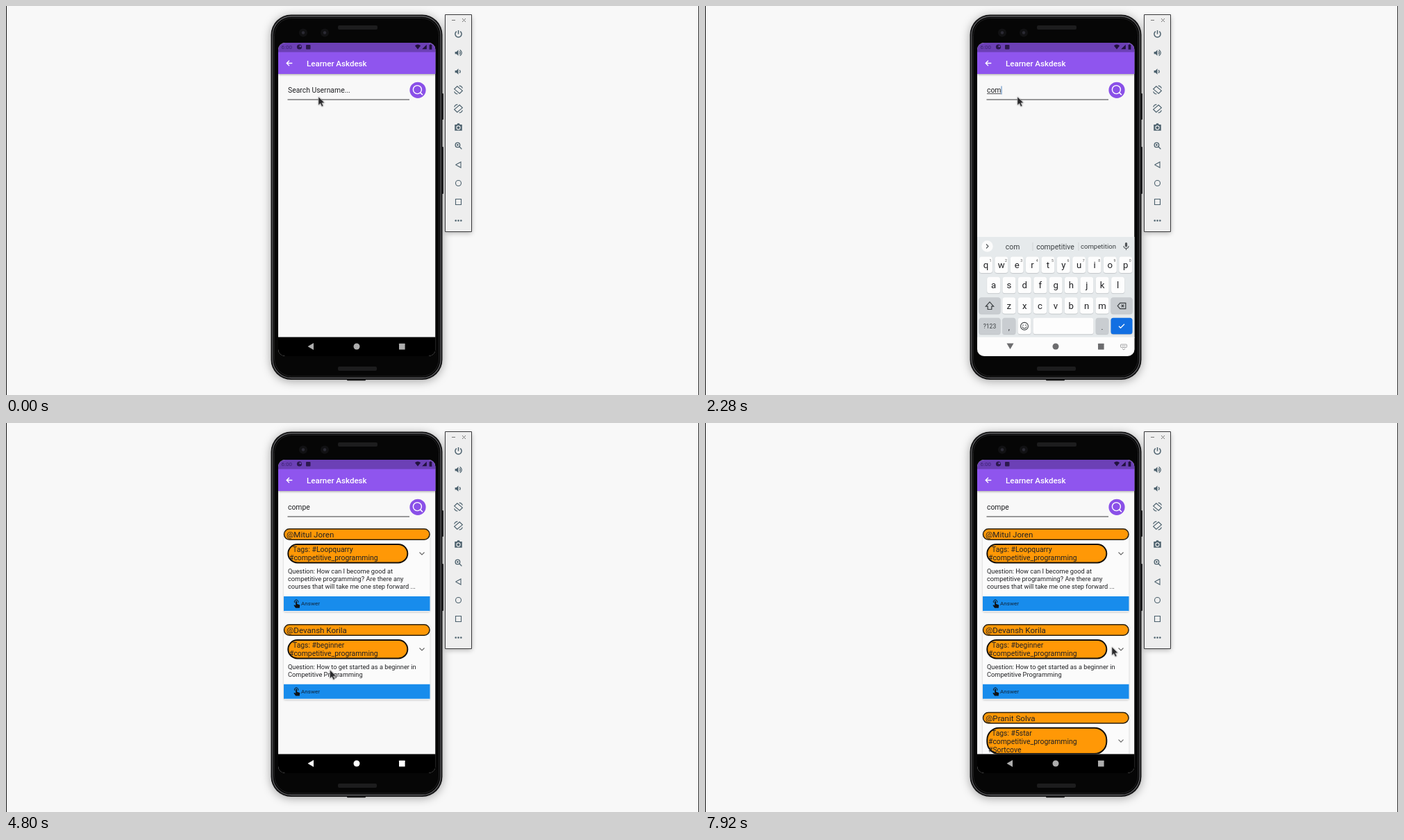
Animation of 998 by 561 pixels, one loop 8 s. Source, as an HTML page with a canvas:

```html
<!DOCTYPE html>
<html lang="en">
<head>
<meta charset="utf-8">
<title>Search demo</title>
<style>
  html, body { margin: 0; width: 100%; height: 100%; overflow: hidden; background: #f8f8f8; }
  canvas { display: block; }
</style>
</head>
<body>
<canvas id="stage" width="998" height="561"></canvas>
<script>
const ctx = document.getElementById('stage').getContext('2d');
const LOOP = 8000;
const ORANGE = '#ff9806', PURPLE = '#8f55ee', INK = '#202124', SLATE = '#4d626e', PAPER = '#f8f8f8';
const SCREEN = { x: 392, y: 53, w: 226.5, h: 452 };
const KEY_STEP = 22.37, KB_TOP = 333, KB_TRAVEL = 172;

const TYPED = [[1800, 'c'], [2000, 'co'], [2200, 'com'], [2440, 'comp'], [2700, 'compe']];
const LIST_AT = 2440, THIRD_AT = 5880;
const KB_PATH = [[740, 172], [840, 72], [920, 72], [1040, 0], [4160, 0], [4200, 8], [4280, 66], [4360, 172]];
const MOUSE_X = [[3000, 450], [3280, 447], [4400, 446], [5160, 485], [6200, 485], [7280, 586]];
const MOUSE_Y = [[3000, 131], [3280, 362], [3720, 491], [4400, 491], [5160, 235], [6200, 235], [7280, 323]];

const CARDS = [
  { y: 0, name: '@Mitul Joren', tags: ['Tags: #Loopquarry', '#competitive_programming'],
    ask: ['Question: How can I become good at', 'competitive programming? Are there any', 'courses that will take me one step forward ...'] },
  { y: 138, name: '@Devansh Korila', tags: ['Tags: #beginner', '#competitive_programming'],
    ask: ['Question: How to get started as a beginner in', 'Competitive Programming'] },
  { y: 264.7, name: '@Pranit Solva', tags: ['Tags: #5star', '#competitive_programming', '#Sortcove'], ask: [] }
];

const ICONS = {
  search: 'M16 10a6 6 0 1 1-12 0a6 6 0 0 1 12 0M14.5 14.5L21 21',
  sticker: 'M4 4h16v11l-5 5H4zM20 14h-6v6M8 9h1M15 9h1M8 13q2 3 4 2',
  clip: 'M5 4h14v17H5zM9 2h6v4H9zM8 10h8M8 14h8M8 17h5',
  micBody: 'M12 2a3 3 0 0 1 3 3v6a3 3 0 0 1-6 0V5a3 3 0 0 1 3-3z',
  micStand: 'M5.5 11a6.5 6.5 0 0 0 13 0M12 17.5V22',
  shift: 'M12 3L21 13H16.5V20H7.5V13H3z',
  erase: 'M8 5H22V19H8L2 12zM11.5 9l6 6M17.5 9l-6 6',
  check: 'M4 12l5 5L20 6',
  power: 'M12 2v10M7 5a8.5 8.5 0 1 0 10 0',
  speaker: 'M3 9h4l5-5v16l-5-5H3z',
  wave: 'M15 8q4 4 0 8',
  bigWave: 'M16 4q10 8 0 16',
  rotate: 'M9 3L22 14L15 21L2 10zM14 2q6 0 8 6M10 22q-6 0-8-6',
  zoom: 'M16 10a6 6 0 1 1-12 0a6 6 0 0 1 12 0M14.5 14.5L21 21M10 7.5v5M7.5 10h5',
  camera: 'M3 6h5l2-3h4l2 3h5v15H3z',
  touch: 'M8 23l-5-7 2-1.5 3 2V6a1.7 1.7 0 0 1 3.4 0v6l8 3-1 8z',
  tap: 'M5.5 9a5 5 0 1 1 8.5 0',
  back: 'M21 12H4M12 4l-8 8 8 8',
  wifi: 'M12 21L1 7q11-9 22 0z',
  signal: 'M2 22L22 2V22z',
  battery: 'M7 4h3V2h4v2h3v18H7z'
};
for (const name in ICONS) ICONS[name] = new Path2D(ICONS[name]);

// Icons sit on a 24-unit grid; a line width strokes them, none fills them.
function icon(name, x, y, size, color, lw) {
  ctx.save();
  ctx.translate(x - size / 2, y - size / 2);
  ctx.scale(size / 24, size / 24);
  if (lw) {
    ctx.strokeStyle = color;
    ctx.lineWidth = lw * 24 / size;
    ctx.stroke(ICONS[name]);
  } else {
    ctx.fillStyle = color;
    ctx.fill(ICONS[name]);
  }
  ctx.restore();
}

function paint(fill, stroke, lw = 1) {
  if (fill) { ctx.fillStyle = fill; ctx.fill(); }
  if (stroke) { ctx.strokeStyle = stroke; ctx.lineWidth = lw; ctx.stroke(); }
}

function box(x, y, w, h, r, fill, stroke, lw) {
  ctx.beginPath();
  ctx.roundRect(x, y, w, h, r);
  paint(fill, stroke, lw);
}

function disc(x, y, r, fill, stroke, lw) {
  ctx.beginPath();
  ctx.arc(x, y, r, 0, Math.PI * 2);
  paint(fill, stroke, lw);
}

function poly(points, fill, stroke, lw) {
  ctx.beginPath();
  points.forEach(([x, y]) => ctx.lineTo(x, y));
  if (fill) ctx.closePath();
  paint(fill, stroke, lw);
}

function text(s, x, y, size, color = INK, weight = 400, align = 'left') {
  ctx.font = `${weight} ${size}px Roboto, "Open Sans", sans-serif`;
  ctx.textAlign = align;
  ctx.fillStyle = color;
  ctx.fillText(s, x, y);
}

function shadow(color, blur, dy, draw) {
  ctx.save();
  ctx.shadowColor = color;
  ctx.shadowBlur = blur;
  ctx.shadowOffsetY = dy;
  draw();
  ctx.restore();
}

function track(keys, t) {
  if (t <= keys[0][0]) return keys[0][1];
  for (let i = 1; i < keys.length; i++) {
    const [t0, a] = keys[i - 1], [t1, b] = keys[i];
    if (t < t1) return a + (b - a) * (t - t0) / (t1 - t0);
  }
  return keys[keys.length - 1][1];
}

function dots(x, y, gap, r, color) {
  for (let i = -1; i <= 1; i++) disc(x + i * gap, y, r, color);
}

function phone() {
  shadow('rgba(0,0,0,.35)', 14, 2, () => box(381.5, 12.5, 247, 526.5, 29, '#141415'));
  box(491, 538, 27, 2.2, 1, '#141415');
  box(627.5, 126, 2.5, 38, 1, '#1b1b1d');
  box(627.5, 203, 2.5, 68, 1, '#1b1b1d');
  box(384, 15, 242, 521.5, 27, '#050505', '#5f5f62', 1.3);
  box(386.5, 17.5, 237, 516.5, 25, '#060606', '#222223', 1);
  for (const x of [428, 459]) {
    disc(x, 38.5, 6, '#111113');
    disc(x, 38.5, 2.2, '#2b2a33');
  }
  box(478, 28, 57, 6, 2, '#1d1d1e');
  box(478, 520, 56, 6, 2, '#1d1d1e');
}

function panel() {
  shadow('rgba(0,0,0,.3)', 7, 2, () => box(632.5, 12.5, 38, 313, 0, '#eeeeee'));
  box(632.5, 12.5, 38, 313, 0, null, '#39393b', 1);
  poly([[642, 20.5], [647, 20.5]], null, '#777', 1);
  poly([[657, 18], [662, 23]], null, '#777', 1);
  poly([[662, 18], [657, 23]], null, '#777', 1);
  const x = 651.5;
  icon('power', x, 40.5, 13, SLATE, 1.5);
  for (const y of [67.5, 94.5]) {
    icon('speaker', x, y, 13, SLATE);
    icon('wave', x, y, 13, SLATE, 1.2);
  }
  icon('bigWave', x, 67.5, 13, SLATE, 1.2);
  icon('rotate', x, 121, 14, SLATE, 1.2);
  ctx.save();
  ctx.translate(2 * x, 0);
  ctx.scale(-1, 1);
  icon('rotate', x, 148, 14, SLATE, 1.2);
  ctx.restore();
  icon('camera', x, 174.5, 14, SLATE);
  disc(x, 175.5, 2.6, SLATE, '#eeeeee', 1.1);
  icon('zoom', x, 201.5, 13, SLATE, 1.4);
  poly([[647.5, 229], [655, 225], [655, 233], [647.5, 229]], null, SLATE, 1.1);
  disc(x, 255.5, 4, null, SLATE, 1.1);
  box(647.5, 278.5, 8, 8, 0, null, SLATE, 1.1);
  dots(x, 309.5, 3.8, 1.3, SLATE);
}

function card({ y, name, tags, ask }) {
  const grow = (tags.length - 2) * 11;
  const bar = 250 + (ask.length - 3) * 11.3 + grow;
  ctx.save();
  ctx.translate(0, y);
  shadow('rgba(0,0,0,.2)', 3, 1, () => box(400, 153, 210.5, bar - 131, 2, '#fbfbfb'));
  box(400.5, 152.8, 209.5, 15.4, 7.7, ORANGE, '#2a2110', 1.5);
  text(name, 404, 165, 11.56);
  box(406.3, 175, 172, 26.4 + grow, 17.3, ORANGE, '#15110a', 2);
  tags.forEach((s, i) => text(s, i ? 408 : 413, 186 + i * 12, 10.4));
  const mid = 188 + grow / 2;
  poly([[595.5, mid - 1.5], [599, mid + 2], [602.5, mid - 1.5]], null, '#666', 1.1);
  ask.forEach((s, i) => text(s, 406, 216.5 + i * 11, 9.24));
  if (ask.length) {
    box(400, bar, 210.5, 21, 0, '#188cec');
    icon('touch', 419.3, bar + 10.8, 13, '#101418');
    icon('tap', 419.3, bar + 10.8, 13, '#101418', 1);
    text('Answer', 425, bar + 13.4, 8.1, '#10253a');
  }
  ctx.restore();
}

function caretOn(t) {
  if (t < 560) return false;
  if (t < 1800) return t < 1060 || t >= 1540;
  if (t < 3760) return t < 3240;
  if (t < 4800) return true;
  return Math.floor((t - 4800) / 500) % 2 === 1;
}

function app(t, typed, kbShown) {
  box(SCREEN.x, SCREEN.y, SCREEN.w, SCREEN.h, 0, PAPER);
  if (t >= LIST_AT) {
    ctx.save();
    ctx.beginPath();
    ctx.rect(392, 140, 227, (kbShown ? KB_TOP : 477.5) - 140);
    ctx.clip();
    CARDS.slice(0, t < THIRD_AT ? 2 : 3).forEach(card);
    ctx.restore();
  }
  shadow('rgba(0,0,0,.35)', 3, 1, () => box(392, 66, 227, 32, 0, PURPLE));
  box(392, 52, 227, 14.5, 0, '#6c40b6');
  text('6:00', 396.5, 62.3, 8, '#3d2273');
  disc(422.5, 59, 3.6, '#2c184f');
  box(422.5, 57, 2.6, 2.2, 0, '#6c40b6');
  box(432, 56, 6.5, 6.5, 1, '#2c184f');
  icon('wifi', 593, 59, 9, '#22123f');
  icon('signal', 602.5, 59, 8, '#22123f');
  icon('battery', 611.5, 59, 9, '#22123f');
  icon('back', 408, 82.5, 11.5, '#fff', 1.3);
  text('Learner Askdesk', 433, 86.7, 11.56, '#fff', 500);

  text(typed || 'Search Username...', 406, 125, 10.4);
  const end = 406 + (typed ? ctx.measureText(typed).width : 0);
  if (typed && t < 4040) box(406, 126.2, end - 406, 0.9, 0, INK);
  if (caretOn(t)) box(end, 115.5, 1.1, 12, 0, '#5f8fc4');
  box(405.5, 134.5, 175.5, 1, 0, '#3a3a3c');
  disc(593, 121.3, 11.6, '#8a50e8');
  disc(592.4, 120.6, 6, null, '#fff', 1.4);
  poly([[596.6, 124.9], [600, 128.3]], null, '#fff', 1.5);
}

function key(x, y, w, fill = '#fdfdfd') {
  shadow('rgba(60,64,70,.25)', 1, 0.8, () => box(x - w / 2, y - 12, w, 23.5, 3.5, fill));
}

function letters(row, x0, y, digits) {
  [...row].forEach((c, i) => {
    const x = x0 + i * KEY_STEP;
    key(x, y, 19);
    text(c, x, y + 4.7, 13.2, INK, 400, 'center');
    if (digits) text((i + 1) % 10, x + 6.6, y - 4.4, 5.2, '#555', 400, 'center');
  });
}

function toolbar(typed) {
  const y = 346.5, grey = '#505558';
  disc(406.5, y, 8.2, '#fbfbfb');
  const d = typed ? 1.5 : -1.5;
  poly([[406.5 - d, y - 3], [406.5 + d, y], [406.5 - d, y + 3]], null, grey, 1.1);
  if (typed) {
    text(typed, 443, 350.5, 10.4, '#3c4043', 400, 'center');
    text('competitive', 504.5, 350.5, 10.5, '#3c4043', 400, 'center');
    text('competition', 566.5, 350.3, 9.6, '#3c4043', 400, 'center');
    for (const x of [471.5, 537.5]) box(x, 341, 1, 12, 0, '#cfd3d6');
  } else {
    icon('search', 436.5, y, 12, grey, 1.3);
    icon('sticker', 468.5, y, 12, grey, 1.1);
    text('GIF', 501, 349.5, 8.6, grey, 700, 'center');
    icon('clip', 534, y, 12.5, grey, 1.1);
    dots(574, y, 3.8, 1.2, grey);
  }
  icon('micBody', 606.5, y, 13, grey);
  icon('micStand', 606.5, y, 13, grey, 1.1);
}

function keyboard(offset, typed) {
  const grey = '#c9cdd1';
  ctx.save();
  ctx.translate(0, offset);
  box(392, KB_TOP, 227, 146, 0, '#e6eaec');
  box(392, 477.5, 227, 28, 0, '#fcfcfc');
  toolbar(typed);
  letters('qwertyuiop', 404.4, 373.5, true);
  letters('asdfghjkl', 415.6, 402.7);
  letters('zxcvbnm', 437.8, 432.2);
  key(410, 432.2, 31, grey);
  icon('shift', 410, 432.5, 15, '#3c4043', 1.2);
  key(600, 432.2, 31, grey);
  icon('erase', 600, 432.5, 14, '#3c4043', 1.2);

  const y = 461.8;
  key(410, y, 31, grey);
  text('?123', 410, y + 3.2, 8.5, '#3c4043', 400, 'center');
  key(437.8, y, 19, grey);
  text(',', 437.8, y + 5, 11, INK, 400, 'center');
  key(460, y, 19);
  disc(460, y, 5.4, null, '#3c4043', 1.1);
  disc(458, y - 1.5, 0.8, '#3c4043');
  disc(462, y - 1.5, 0.8, '#3c4043');
  ctx.beginPath();
  ctx.arc(460, y + 0.5, 2.8, 0, Math.PI);
  paint(null, '#3c4043', 1);
  key(516, y, 87);
  key(572, y, 18.5, grey);
  text('.', 572, y + 5, 11, INK, 400, 'center');
  key(600, y, 31, '#126fe2');
  icon('check', 600, y, 12, '#fff', 1.3);
  ctx.restore();
}

function navIcons(t, kbShown) {
  let color = kbShown ? '#6c6c6e' : '#adadad';
  if (kbShown && t < 1000) color = 'rgba(115,115,118,.7)';
  if (!kbShown && t > 4300) {
    const v = Math.round(track([[7480, 255], [7620, 173]], t));
    color = `rgb(${v},${v},${v})`;
  }
  if (t >= 4080 && t < 4340) box(412, 481, 55, 22, 11, 'rgba(0,0,0,.07)');
  const down = t >= 1000 && t < 4360;
  poly(down ? [[434.5, 486.5], [444.5, 486.5], [439.5, 495]]
            : [[434.5, 491], [443, 486], [443, 496]], color);
  disc(505, 491, 4.5, color);
  box(566, 486.8, 8.6, 8.6, 0.5, color);
  if (down) {
    box(598.5, 488, 9, 4.5, 1, null, '#8b8b8d', 0.8);
    box(600, 489.7, 6, 0.9, 0, '#9a9a9c');
    poly([[601, 494], [603, 496], [605, 494]], null, '#8b8b8d', 0.8);
  }
}

function mouse(t) {
  ctx.save();
  ctx.translate(track(MOUSE_X, t), track(MOUSE_Y, t));
  ctx.beginPath();
  [[0, 0], [0, 12], [2.8, 9.5], [4.9, 14], [6.9, 13.1], [4.9, 8.8], [8.6, 8.6]]
    .forEach(([x, y]) => ctx.lineTo(x, y));
  ctx.closePath();
  ctx.shadowColor = 'rgba(0,0,0,.4)';
  ctx.shadowBlur = 2;
  paint('#2b2b2d', 'rgba(235,235,235,.7)', 0.7);
  ctx.restore();
}

function draw(t) {
  const typed = TYPED.reduce((s, [at, word]) => t >= at ? word : s, '');
  const offset = track(KB_PATH, t);
  const kbShown = offset < KB_TRAVEL;

  box(0, 0, 998, 561, 0, PAPER);
  box(0, 0, 1, 561, 0, '#111');
  box(997, 0, 1, 561, 0, '#333');
  phone();
  panel();

  ctx.save();
  ctx.beginPath();
  ctx.roundRect(SCREEN.x, SCREEN.y, SCREEN.w, SCREEN.h, 10);
  ctx.clip();
  app(t, typed, kbShown);
  box(392, 477.5, 227, 28, 0, '#000');
  if (kbShown) keyboard(offset, t < 4040 ? typed : '');
  navIcons(t, kbShown);
  ctx.restore();
  mouse(t);
}

function tick(now) {
  draw(Math.floor((now % LOOP) / 40) * 40);
  requestAnimationFrame(tick);
}
requestAnimationFrame(tick);
</script>
</body>
</html>
```
